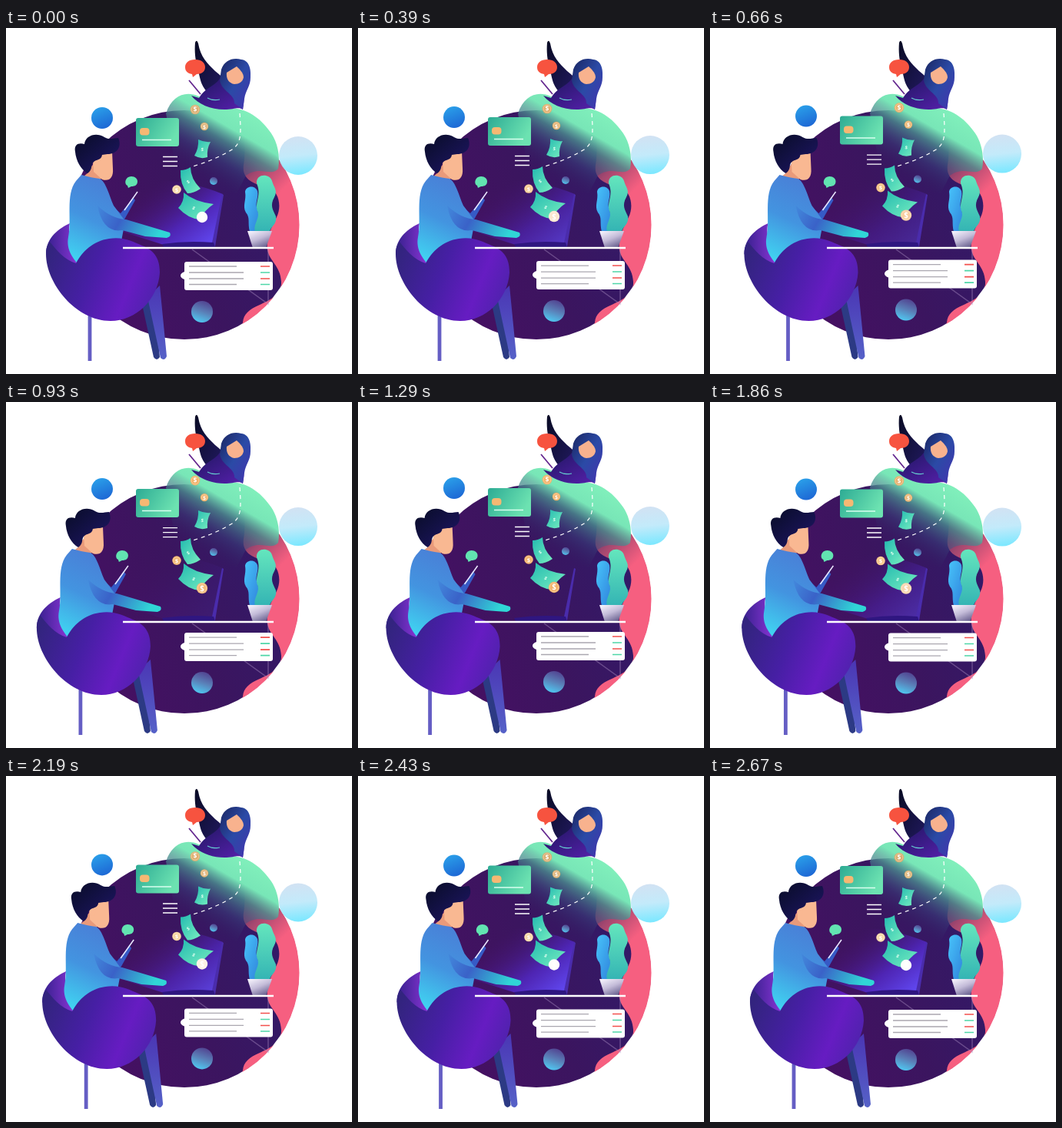
Animation, 450 px wide and 450 px high, one loop 2700 ms. Source, as an HTML page:

```html
<!DOCTYPE html>
<html lang="en">
<head>
<meta charset="utf-8">
<title>Online payments</title>
<style>
html, body { margin: 0; height: 100%; overflow: hidden; background: #fff; }
svg { display: block; width: 100vw; height: 100vh; }
text { font-family: "Open Sans", sans-serif; font-weight: 700; text-anchor: middle; }
</style>
</head>
<body>
<svg viewBox="0 0 450 450">
<defs>
  <linearGradient id="disc" x1="0" y1=".7" x2="1" y2=".3"><stop stop-color="#480f63"/><stop offset=".5" stop-color="#3b155f"/><stop offset="1" stop-color="#301b6a"/></linearGradient>
  <linearGradient id="pink" gradientUnits="userSpaceOnUse" x1="306" y1="160" x2="358" y2="212"><stop stop-color="#4f2460"/><stop offset=".45" stop-color="#a3476f"/><stop offset="1" stop-color="#f65f80"/></linearGradient>
  <linearGradient id="mint" gradientUnits="userSpaceOnUse" x1="306" y1="106" x2="254" y2="196"><stop stop-color="#80efbb"/><stop offset=".27" stop-color="#78e6b7"/><stop offset=".45" stop-color="#4c8f90" stop-opacity=".78"/><stop offset=".7" stop-color="#3a4a80" stop-opacity=".4"/><stop offset="1" stop-color="#30205c" stop-opacity="0"/></linearGradient>
  <linearGradient id="cyan" x1=".4" y1="0" x2=".5" y2="1"><stop stop-color="#cfe0f2"/><stop offset=".5" stop-color="#bfe9fa"/><stop offset="1" stop-color="#72e6ff"/></linearGradient>
  <linearGradient id="blue" x1=".3" y1="0" x2=".7" y2="1"><stop stop-color="#2a9fe9"/><stop offset="1" stop-color="#1d66d4"/></linearGradient>
  <linearGradient id="orb" x1=".7" y1="0" x2=".35" y2="1"><stop stop-color="#51418f"/><stop offset=".5" stop-color="#5a80b8"/><stop offset="1" stop-color="#50c9f2"/></linearGradient>
  <linearGradient id="card" x1="0" y1="0" x2="1" y2=".4"><stop stop-color="#2dab94"/><stop offset="1" stop-color="#6ce2b1"/></linearGradient>
  <linearGradient id="bill" x1="0" y1="0" x2="1" y2="1"><stop stop-color="#22b9b0"/><stop offset="1" stop-color="#78efc0"/></linearGradient>
  <linearGradient id="glow" gradientUnits="userSpaceOnUse" x1="258" y1="285" x2="195" y2="202"><stop stop-color="#6148f2"/><stop offset=".4" stop-color="#5228c4" stop-opacity=".85"/><stop offset="1" stop-color="#471270" stop-opacity="0"/></linearGradient>
  <linearGradient id="chair" x1="0" y1=".3" x2="1" y2=".6"><stop stop-color="#33247f"/><stop offset=".4" stop-color="#461fa4"/><stop offset=".75" stop-color="#661cc2"/><stop offset="1" stop-color="#4f22ad"/></linearGradient>
  <linearGradient id="seat"><stop stop-color="#35208c"/><stop offset="1" stop-color="#8c35d8"/></linearGradient>
  <linearGradient id="shirt" x1=".6" y1="0" x2=".3" y2="1"><stop stop-color="#4a7ed6"/><stop offset=".5" stop-color="#4394e0"/><stop offset="1" stop-color="#40d6f2"/></linearGradient>
  <linearGradient id="sleeve" x1="0" y1="0" x2="1" y2=".25"><stop stop-color="#4389dc"/><stop offset=".4" stop-color="#3a62c8"/><stop offset="1" stop-color="#30d6d6"/></linearGradient>
  <linearGradient id="hair" x1="0" y1="0" x2="1" y2="1"><stop stop-color="#080c26"/><stop offset="1" stop-color="#20176a"/></linearGradient>
  <linearGradient id="leg" x1="0" y1="0" x2="0" y2="1"><stop stop-color="#4a35b4"/><stop offset="1" stop-color="#5662c8"/></linearGradient>
  <linearGradient id="scarf" x1="0" y1="0" x2="1" y2="1"><stop stop-color="#1a2560"/><stop offset=".5" stop-color="#2b4aa6"/><stop offset="1" stop-color="#4632b0"/></linearGradient>
  <linearGradient id="robe" x1="0" y1="0" x2="1" y2="1"><stop stop-color="#1f1660"/><stop offset="1" stop-color="#5620ac"/></linearGradient>
  <linearGradient id="arm" x1="0" y1="0" x2="1" y2="1"><stop stop-color="#090b24"/><stop offset="1" stop-color="#221a62"/></linearGradient>
  <linearGradient id="stemA" x1="0" y1="0" x2="1" y2="1"><stop stop-color="#48c4fa"/><stop offset="1" stop-color="#2f83dc"/></linearGradient>
  <linearGradient id="stemB" x1="0" y1="0" x2="0" y2="1"><stop stop-color="#64e6bd"/><stop offset="1" stop-color="#34b4b4"/></linearGradient>
  <linearGradient id="pot" x1=".2" y1="0" x2=".8" y2="1"><stop stop-color="#f2effa"/><stop offset=".45" stop-color="#c3bbd8"/><stop offset="1" stop-color="#5b5384"/></linearGradient>
  <clipPath id="inDisc"><circle cx="232" cy="256" r="149.500"/></clipPath>
</defs>

<circle cx="232" cy="256" r="149" fill="url(#disc)"/>
<g clip-path="url(#inDisc)">
  <path fill="url(#pink)" d="M318 120C306 140 313 157 309 178C306 199 326 204 341 207C355 212 359 232 352 246C344 262 338 274 340 288C342 303 357 309 358 330C359 348 342 354 330 360C316 366 309 372 308 383C306 392 299 393 296 404L320 430L400 380V120Z"/>
</g>
<path fill="url(#mint)" d="M208 111C216 88 233 81 251 89C265 96 276 103 293 104C318 106 333 120 345 137C353 149 357 166 354 183C345 194 330 178 312 192L300 215L225 205Z"/>
<path d="M304 111C306 138 306 150 294 158C278 168 262 174 243 180" fill="none" stroke="#fff" stroke-width="1.2" stroke-dasharray="5 5"/>

<!-- woman -->
<path fill="url(#arm)" d="M246 19Q248 14 250 20C253 38 262 46 272 56L284 66L262 84C252 72 253 66 250 56C246 42 245 30 246 19Z"/>
<path fill="url(#robe)" d="M278 66C270 77 258 78 251 91L241 88C250 99 266 106 284 106C296 106 303 102 308 106C311 90 310 84 300 74Z"/>
<path fill="url(#scarf)" d="M280 54C284 42 295 38 306 41C316 42 319 53 318 64C318 76 312 80 310 92L308 106L297 98C298 86 280 82 278 68Z"/>
<path fill="#f8b28e" d="M287 58L300 50Q309 58 309 64C308 70 303 73 297 73C290 72 286 66 287 58Z"/>
<path d="M262 91Q269 95 278 93" fill="none" stroke="#65cbd0" stroke-width="1.2"/>
<path d="M238 68L253 86" stroke="#63268e" stroke-width="1.8"/>
<path fill="#f7533f" d="M246 41C254 41 259 45 259 51C259 57 254 60 248 60L243 64L242 60C236 59 233 56 233 51C233 45 238 41 246 41Z"/>

<!-- laptop and table legs -->
<path id="beam" fill="url(#glow)" d="M282 216L269 282H205L148 264L150 204Q215 188 282 216Z"/>
<path fill="#4a2cac" d="M281 216L283 217L272 284H267Z"/>
<path d="M203 281Q235 276 270 279L272 285H205Z" fill="#2f1680"/>
<path d="M242 288L341 359V288" fill="none" stroke="#a78abf" stroke-width="1.5" opacity=".45"/>

<!-- plant -->
<path fill="url(#stemA)" d="M311 213C312 205 324 204 327 212C329 222 323 226 327 236C330 245 326 252 329 265H317C314 253 318 247 312 240C307 231 313 224 311 213Z"/>
<path fill="url(#stemB)" d="M326 202C325 189 343 189 346 199C348 207 354 211 349 220C343 231 347 236 351 245C353 255 344 258 343 265H324C321 255 331 247 327 238C323 226 333 218 326 202Z"/>
<path fill="url(#pot)" d="M314 264H346L338 286H321Z"/>

<g id="floating">
  <circle cx="125" cy="117" r="14" fill="url(#blue)"/>
  <circle cx="380" cy="166" r="25" fill="url(#cyan)" opacity=".94"/>
  <circle cx="255" cy="369" r="14" fill="url(#orb)"/>
  <circle cx="270" cy="199" r="5" fill="url(#orb)"/>
  <rect x="169" y="117" width="56" height="37" rx="3" fill="url(#card)"/>
  <rect x="174" y="130" width="12.500" height="9.500" rx="4" fill="#f6b873"/>
  <path d="M177 145.500H215" stroke="#d9fff0" stroke-width="1.5"/>
  <path d="M204 167.500H223M204 173.500H223M204 179.500H223" stroke="#fff" stroke-width="1.4"/>
  <g fill="url(#bill)">
    <path d="M250 145Q258 149 266 148Q261 157 262 168Q253 171 245 166Q251 156 250 145Z"/>
    <path d="M227 185Q234 185 240 181Q240 196 253 209Q244 215 236 215Q226 203 227 185Z"/>
    <path d="M231 214Q245 226 270 229Q258 237 252 249Q237 248 224 234Q232 226 231 214Z"/>
  </g>
  <g fill="#dffff0" font-size="6">
    <text transform="translate(255 160) rotate(10)">$</text>
    <text transform="translate(238 202) rotate(-30)">$</text>
    <text transform="translate(243 236) rotate(35)">$</text>
  </g>
  <g id="coins"></g>
  <path fill="#fff" d="M235 304H344Q347 304 347 307V338Q347 341 344 341H235Q232 341 232 338V327Q227 325 227 322Q227 319 232 317V307Q232 304 235 304Z"/>
  <path d="M238 310H300M238 318H309M238 326H309M238 333.500H300" stroke="#aaa7b0" stroke-width="1.3"/>
  <path d="M331 310H343M331 326H343" stroke="#f2504d" stroke-width="1.6"/>
  <path d="M331 318H343M331 333.500H343" stroke="#4fd6a8" stroke-width="1.6"/>
</g>

<g id="man">
  <path d="M109 368V433" stroke="#655ec4" stroke-width="4.800"/>
  <path fill="#2c3a84" d="M176 355L192 345L200 428Q196 434 192 428Z"/>
  <path fill="url(#leg)" d="M184 350L200 335L209 427Q206 434 201 429Z"/>
  <path fill="url(#seat)" d="M52 294C52 272 70 260 83 254C80 266 84 280 95 310L70 320Z"/>
  <path fill="#e99a7a" d="M110 181L119 172L128 192L116 203L98 194Q108 190 110 181Z"/>
  <path fill="#f9b892" d="M113 164L138 160L139 183C140 195 134 200 125 197L114 187Z"/>
  <path fill="url(#hair)" d="M90 161C88 151 95 149 102 151C103 140 117 135 128 142C135 146 140 143 146 143C151 154 145 164 132 164L125 165C124 172 119 170 113 175C110 179 113 184 106 189C97 184 91 172 90 161Z"/>
  <path fill="#f9b892" d="M113 177C114 171 121 171 121 177C121 183 114 184 113 177Z"/>
  <path fill="#365ac6" d="M126 220L149 241L159 229L165 220L168 224L154 249L135 250Z"/>
  <path fill="url(#shirt)" d="M98 191Q112 195 122 196C130 200 134 217 140 231L155 251L150 277L97 311C87 300 78 288 81 272C86 249 77 217 91 199Z"/>
  <path fill="url(#sleeve)" d="M119 231Q137 248 156 249L213 266Q216 271 209 273L181 271L151 263Q126 267 119 231Z"/>
  <path d="M154 237L171 213" stroke="#ece9ff" stroke-width="1.5"/>
  <path fill="#62e4b1" d="M163 193C168 193 171 196 171 199.500C171 204 168 206 163 206L159 208L158 205C153 203 155 193 163 193Z"/>
  <path fill="url(#chair)" d="M52 294C52 286 54 281 57 278C65 288 76 302 91 306C99 291 113 277 134 274C153 271 165 278 177 283C195 290 200 302 200 318C198 353 169 381 136 381C91 381 52 332 52 294Z"/>
</g>
<path d="M152 286H348" stroke="#fff" stroke-width="2.500"/>
</svg>
<script>
const PERIOD = 2700;
const FADE_LEAD = 0.3;
const byId = id => document.getElementById(id);
const wave = angle => (1 - Math.cos(angle)) / 2;
const mix = (a, b, k) => a.map((v, i) => Math.round(v + (b[i] - v) * k));

// x, y, radius, lightest colour
const coins = [
  [246, 106, 6.3, [218, 174, 112]],
  [258, 128, 5.2, [222, 178, 116]],
  [222, 210, 5.8, [248, 217, 165]],
  [255, 246, 7.2, [255, 255, 255]]
];
byId("coins").innerHTML = coins.map(([x, y, r]) =>
  `<g transform="translate(${x} ${y})"><circle r="${r}"/><circle r="${r - 1.5}" fill="none" stroke="#fff" stroke-width=".6" opacity=".55"/><text y="${r * .48}" font-size="${r * 1.35}" fill="#fff">$</text></g>`).join("");
const discs = byId("coins").querySelectorAll("g > circle:first-child");

function draw(now) {
  const angle = now / PERIOD * 2 * Math.PI;
  const swing = wave(angle);
  const fade = wave(angle + FADE_LEAD);
  byId("man").setAttribute("transform", `translate(${-15.5 * swing} 0)`);
  byId("floating").setAttribute("transform", `translate(0 ${-5 * swing})`);
  byId("beam").setAttribute("opacity", 1 - fade);
  discs.forEach((disc, i) =>
    disc.setAttribute("fill", `rgb(${mix(coins[i][3], [244, 178, 104], fade)})`));
  requestAnimationFrame(() => draw(performance.now()));
}
draw(0);
</script>
</body>
</html>
```
